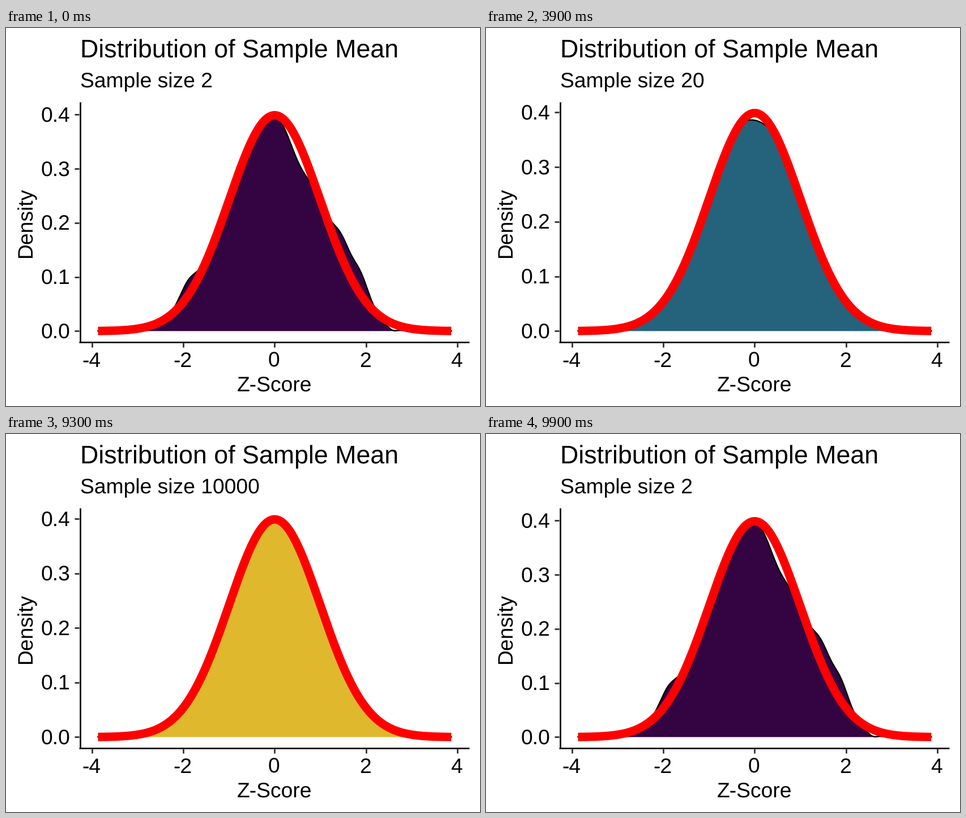
Recreate the animation shown at these times as a matplotlib script. Size 837x669 px, loop 10 s.

```python
import numpy as np
import matplotlib.pyplot as plt
from matplotlib.animation import FuncAnimation

W, H, DPI = 837, 669, 64
PT = 72 / DPI
plt.rcParams["font.family"] = ["Liberation Sans", "DejaVu Sans"]
plt.rcParams["text.hinting"] = "none"

# Panel geometry in pixels
LEFT, RIGHT, TOP, BOTTOM = 130.8, 818.2, 131.2, 555.6
X0, XUNIT = 474.4, 80.6
BASE, PEAK = 536.4, 150.5
TEXT, TITLE = 37.2, 44.7

# Sample size, fill, and bumps added to the normal curve: height, centre, width
STATES = [
    (2, "440154", [(.028, -1.9, .27), (.007, -.12, .2), (-.037, .52, .33),
                   (.04, 1.48, .27), (.038, 1.88, .25), (-.0125, 2.58, .22)]),
    (5, "472D7B", [(-.026, .06, .46), (.022, 1.8, .3)]),
    (10, "3B528B", [(-.0236, .06, .46), (.0155, 1.8, .3)]),
    (20, "2C728E", [(-.014, .05, .35), (.005, 1.6, .5)]),
    (30, "21908C", [(.008, -.45, .2), (-.016, .2, .3)]),
    (50, "27AD81", [(.022, -.42, .2), (-.03, .18, .36), (.0135, 2.17, .2)]),
    (100, "5DC863", [(-.017, .2, .25)]),
    (1000, "AADC32", [(-.0215, .23, .21)]),
    (10000, "FDE725", []),
]

# Each transition: first changed tick and number of steps
MOVES = list(zip([4, 16, 28, 39, 50, 60, 71, 82, 93],
                 [8, 8, 7, 7, 6, 7, 7, 7, 7]))

RGB_XYZ = np.array([[.4124, .3576, .1805],
                    [.2126, .7152, .0722],
                    [.0193, .1192, .9505]])
WHITE = RGB_XYZ.sum(axis=1)


def to_lab(code):
    c = np.array(list(bytes.fromhex(code))) / 255
    lin = np.where(c > .04045, ((c + .055) / 1.055) ** 2.4, c / 12.92)
    v = RGB_XYZ @ lin / WHITE
    f = np.where(v > .008856, np.cbrt(v), 7.787 * v + 16 / 116)
    return np.array([116 * f[1] - 16, 500 * (f[0] - f[1]), 200 * (f[1] - f[2])])


def from_lab(lab):
    """Lab to a screen colour with a 1.8 gamma."""
    fy = (lab[0] + 16) / 116
    f = np.array([fy + lab[1] / 500, fy, fy - lab[2] / 200])
    v = np.where(f > .2069, f ** 3, (f - 16 / 116) / 7.787)
    lin = np.clip(np.linalg.solve(RGB_XYZ, v * WHITE), 0, 1)
    lin[0] += .025 * lin[1]
    return tuple(np.clip(lin, 0, 1) ** (1 / 1.8))


z = np.linspace(-3.885, 3.885, 500)
normal = np.exp(-z * z / 2) / np.sqrt(2 * np.pi)
px = X0 + XUNIT * z
core = np.abs(z) <= 3.873


def density(bumps):
    extra = sum(a * np.exp(-((z - c) / w) ** 2) for a, c, w in bumps)
    return np.maximum(normal + extra, 0)


sizes = [s for s, _, _ in STATES]
labs = [to_lab(c) for _, c, _ in STATES]
curves = [density(b) for _, _, b in STATES]
tops = [max(c.max(), normal.max()) for c in curves]

fig = plt.figure(figsize=(W / DPI, H / DPI), dpi=DPI, facecolor="white")
ax = fig.add_axes([0, 0, 1, 1])
ax.set_xlim(0, W)
ax.set_ylim(H, 0)
ax.axis("off")


def line(xs, ys, color, width, **kw):
    return ax.plot(xs, ys, color=color, lw=width * PT,
                   solid_capstyle="butt", **kw)[0]


def label(x, y, s, size=TEXT, **kw):
    return ax.text(x, y, s, fontsize=size * PT, color="black",
                   va="baseline", **kw)


area = ax.fill(px, px, lw=0)[0]
edge = line(px, px, "black", 2.4)
bell = line(px[core], px[core], "#ff0000", 15, solid_joinstyle="round")

line([LEFT, LEFT], [TOP, BOTTOM + 1.3], "black", 2.6)
line([LEFT - 1.3, RIGHT], [BOTTOM, BOTTOM], "black", 2.6)
label(LEFT, 51.5, "Distribution of Sample Mean", TITLE)
subtitle = label(LEFT, 105, "")
label(X0 - .5, 643.5, "Z-Score", ha="center")
label(45.5, 344, "Density", rotation=90, rotation_mode="anchor", ha="center")

for v in range(-4, 5, 2):
    x = X0 + XUNIT * v
    line([x, x], [BOTTOM + 1.3, BOTTOM + 9.3], "#333333", 2.8)
    label(x - 1, 600, str(v), ha="center")

ticks = []
for k in range(5):
    mark = line([LEFT - 9.5, LEFT - 1.3], [0, 0], "#333333", 2.8)
    ticks.append((k / 10, mark, label(61.6, 0, f"{k / 10:.1f}")))


def state_at(n):
    """Indices of the two states around tick n and the progress between."""
    for i, (start, steps) in enumerate(MOVES):
        if n < start:
            return i, i, 0
        if n < start + steps:
            return i, (i + 1) % len(STATES), (n - start + 1) / steps
    return 0, 0, 0


def update(n):
    a, b, t = state_at(n)

    def mix(values):
        return values[a] * (1 - t) + values[b] * t

    scale = (BASE - PEAK) / mix(tops)
    y = BASE - scale * mix(curves)
    outline = np.column_stack([px, y])
    area.set_xy(np.vstack([outline, [px[-1], BASE], [px[0], BASE]]))
    area.set_facecolor(from_lab(mix(labs)))
    edge.set_ydata(y)
    bell.set_ydata(BASE - scale * normal[core])
    subtitle.set_text(f"Sample size {sizes[b if t >= .5 else a]}")
    for value, mark, text in ticks:
        ty = BASE - scale * value
        mark.set_ydata([ty, ty])
        text.set_y(ty + 13.2)
    return []


update(0)
anim = FuncAnimation(fig, update, frames=100, interval=100,
                     init_func=lambda: update(0), repeat=True)
plt.show()
```
